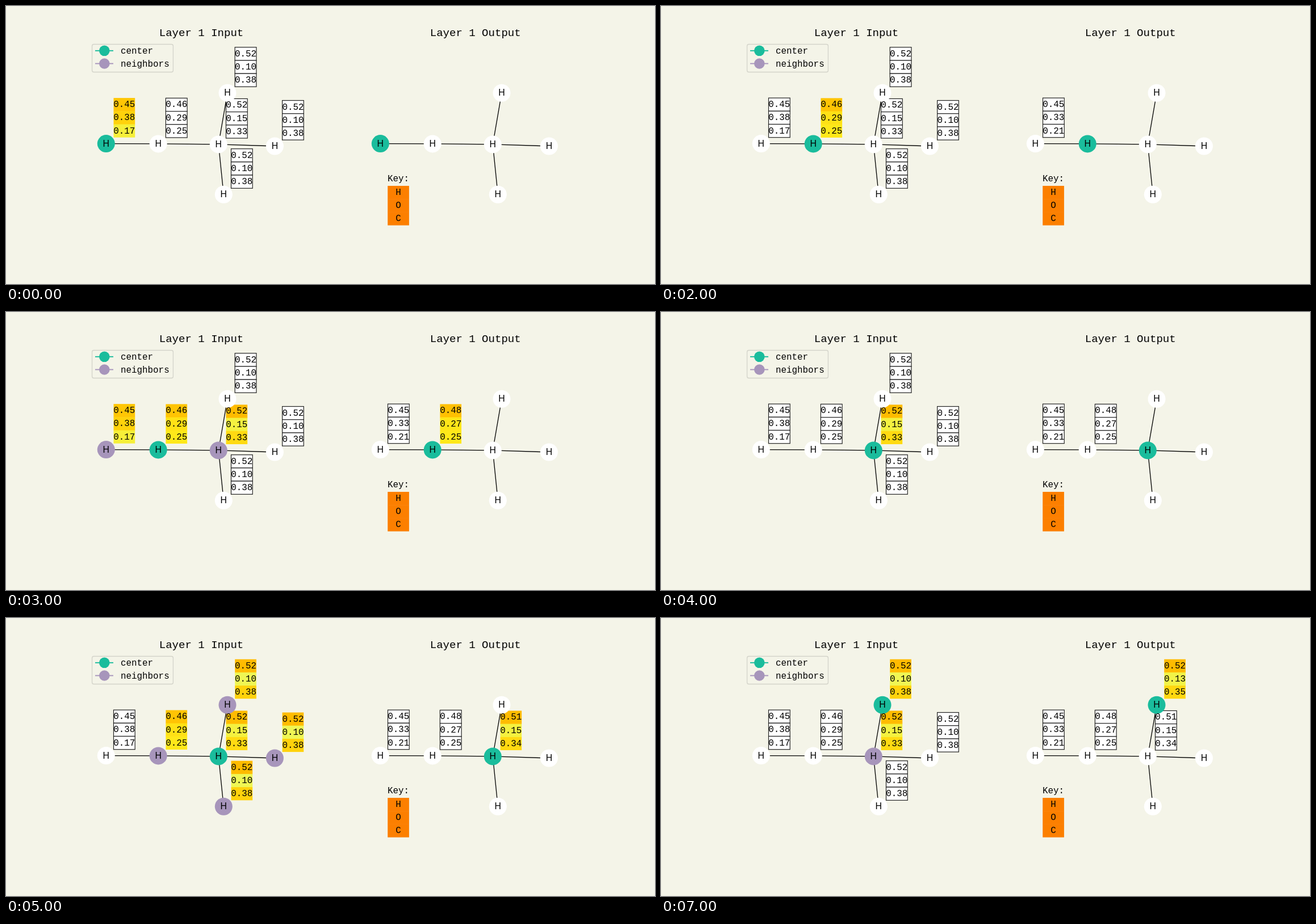
Recreate the animation shown at these times as an HTML page with a canvas. Size 1143x490 px, loop 8 s.

```html
<!DOCTYPE html>
<html>
<head>
<meta charset="utf-8">
<style>
html, body { margin: 0; width: 100%; height: 100%; overflow: hidden; background: #f4f4e8; }
canvas { display: block; }
</style>
</head>
<body>
<canvas id="stage" width="1143" height="490"></canvas>
<script>
const ctx = document.getElementById('stage').getContext('2d');
const BG = '#f4f4e8', TEAL = '#1abc9c', PURPLE = '#a795bb', WHITE = '#fff', INK = '#000';
const MONO = '"Liberation Mono", "Courier New", monospace';
const SANS = '"Liberation Sans", Arial, sans-serif';
const SIZE = 15.87, ROW = 23.2, CELL_W = 37.7, OUTPUT_X = 483;

const nodes = [
  { x: 176.3, y: 242.6, input: [.45, .38, .17], output: [.45, .33, .21] },
  { x: 268.2, y: 242.9, input: [.46, .29, .25], output: [.48, .27, .25] },
  { x: 374.3, y: 243.9, input: [.52, .15, .33], output: [.51, .15, .34] },
  { x: 390, y: 153.2, input: [.52, .10, .38], output: [.52, .13, .35] },
  { x: 473.4, y: 247, input: [.52, .10, .38] },
  { x: 383.3, y: 332.2, input: [.52, .10, .38] }
];
const edges = [[0, 1], [1, 2], [2, 3], [2, 4], [2, 5]];
const linked = (a, b) => edges.some(e => e.includes(a) && e.includes(b) && a !== b);

// Yellow to orange colour ramp over 0..1
const ramp = [[228, 255, 122], [255, 232, 26], [255, 189, 0], [255, 160, 0], [252, 127, 0]];
function heat(v) {
  const i = Math.min(3, Math.floor(v * 4)), f = v * 4 - i;
  return `rgb(${ramp[i].map((c, k) => Math.round(c + (ramp[i + 1][k] - c) * f))})`;
}

function text(str, x, y, size = SIZE, align = 'center', family = MONO) {
  ctx.font = `${size}px ${family}`;
  ctx.textAlign = align;
  ctx.fillStyle = INK;
  ctx.fillText(str, x, y);
}

function line(x1, y1, x2, y2, color = INK, width = 1.3) {
  ctx.strokeStyle = color;
  ctx.lineWidth = width;
  ctx.beginPath();
  ctx.moveTo(x1, y1);
  ctx.lineTo(x2, y2);
  ctx.stroke();
}

function disc(x, y, r, color) {
  ctx.fillStyle = color;
  ctx.beginPath();
  ctx.arc(x, y, r, 0, 2 * Math.PI);
  ctx.fill();
}

function cells(x, y, values, hot) {
  values.forEach((v, i) => {
    const top = y + i * ROW;
    ctx.fillStyle = hot ? heat(v) : WHITE;
    ctx.fillRect(x, top, CELL_W, ROW + (hot && i < 2 ? .5 : 0));
    if (!hot) {
      ctx.strokeStyle = '#222';
      ctx.lineWidth = 1.2;
      ctx.strokeRect(x, top, CELL_W, ROW);
    }
  });
}

function graph(dx, colorOf, tableOf) {
  const tables = nodes.map((n, i) => ({ x: n.x + dx + 13.2, y: n.y - 80.5, ...tableOf(n, i) }));
  const shown = tables.filter(t => t.values);
  shown.forEach(t => cells(t.x, t.y, t.values, t.hot));
  for (const [a, b] of edges) line(nodes[a].x + dx, nodes[a].y, nodes[b].x + dx, nodes[b].y);
  nodes.forEach((n, i) => {
    disc(n.x + dx, n.y, 15.5, colorOf(i));
    text('H', n.x + dx, n.y + 5.1, SIZE, 'center', SANS);
  });
  for (const t of shown)
    t.values.forEach((v, i) => text(v.toFixed(2), t.x + CELL_W / 2, t.y + i * ROW + 16));
}

function legend() {
  ctx.strokeStyle = '#d3d3c9';
  ctx.lineWidth = 1.3;
  ctx.beginPath();
  ctx.roundRect(151.6, 67.5, 142.8, 49, 3);
  ctx.stroke();
  [['center', TEAL, 78.8], ['neighbors', PURPLE, 101.5]].forEach(([name, color, y]) => {
    line(157, y, 189, y, color, 1.9);
    disc(173.3, y, 9.3, color);
    text(name, 202, y + 5.4, SIZE, 'left');
  });
}

function key() {
  text('Key:', 691, 309);
  cells(672.2, 317, [1, 1, 1], true);
  [...'HOC'].forEach((c, i) => text(c, 691, 332.6 + i * ROW));
}

function draw(ms) {
  // Each centre: alone, then with neighbours, then with its result
  const center = Math.floor(ms / 2000), phase = Math.min(2, Math.floor(ms % 2000 / 500));
  const isNeighbor = i => phase > 0 && linked(i, center);
  ctx.fillStyle = BG;
  ctx.fillRect(0, 0, 1143, 490);
  text('Layer 1 Input', 344, 53, SIZE * 1.2);
  text('Layer 1 Output', 826.7, 53, SIZE * 1.2);
  legend();
  graph(0,
    i => i === center ? TEAL : isNeighbor(i) ? PURPLE : WHITE,
    (n, i) => ({ values: n.input, hot: i === center || isNeighbor(i) }));
  graph(OUTPUT_X,
    i => i === center ? TEAL : WHITE,
    (n, i) => ({
      values: i < center || (i === center && phase === 2) ? n.output : null,
      hot: i === center
    }));
  key();
}

const start = performance.now();
function tick() {
  draw((performance.now() - start) % 8000);
  requestAnimationFrame(tick);
}
tick();
</script>
</body>
</html>
```
